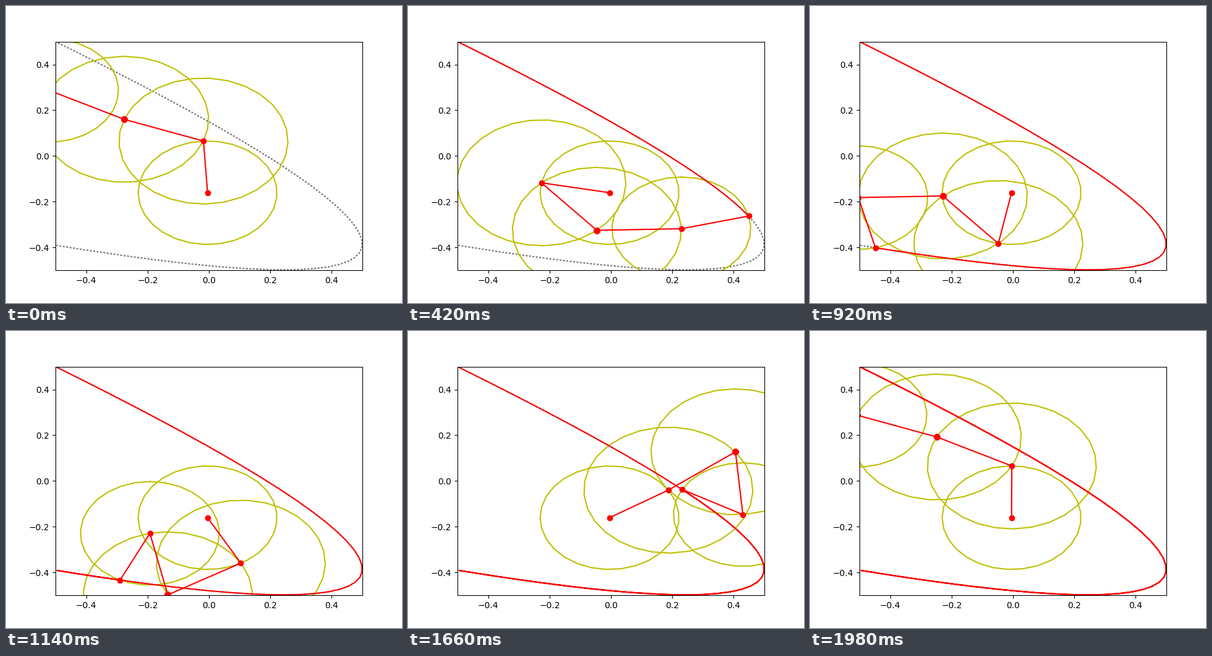
These frames come from a looping animation (640x480 px, 2 s). A matplotlib script:

```python
import numpy as np
import matplotlib.pyplot as plt
from matplotlib.animation import FuncAnimation

N = 100                        # samples and frames per loop
CENTER = -0.0045 - 0.1605j     # constant term
AXIS1 = -0.0126 + 0.4525j      # cos(u) term
AXIS2 = -0.504 + 0.222j        # cos(2u) term

# Each cosine splits into a pair of opposite rotations; the terms follow
# FFT order, so the vanishing ones all sit between +2 and -2.
freqs = np.array([1, 2] + [0] * (N - 5) + [-2, -1])
coefs = np.zeros(N - 1, dtype=complex)
half_step = np.pi / N
for k, axis in ((1, AXIS1), (2, AXIS2)):
    for f in (k, -k):
        coefs[freqs == f] = axis / 2 * np.exp(1j * f * half_step)


def joints(i):
    """Arm joints from the fixed centre to the pen at step i."""
    arms = coefs * np.exp(2j * np.pi * freqs * i / N)
    return np.cumsum(np.concatenate(([CENTER], arms)))


def show(line, z):
    line.set_data(z.real, z.imag)


poses = [joints(i) for i in range(N)]
curve = np.array([p[-1] for p in poses])
ring = np.exp(1j * np.linspace(0, 2 * np.pi, 30))
moving = np.flatnonzero(coefs)

fig, ax = plt.subplots(figsize=(6.4, 4.8), dpi=100)
ax.set_xlim(-0.5, 0.5)
ax.set_ylim(-0.5, 0.5)

ax.plot(curve.real, curve.imag, ":", color="gray")
circles = [ax.plot([], [], "y-")[0] for _ in moving]
chain, = ax.plot([], [], "ro-")
trail, = ax.plot([], [], "r-")


def update(i):
    pose = poses[i]
    for circle, k in zip(circles, moving):
        show(circle, pose[k] + coefs[k] * ring)
    show(chain, pose)
    show(trail, curve[:i + 1])
    return [*circles, chain, trail]


anim = FuncAnimation(fig, update, frames=N, interval=20, repeat=True,
                     repeat_delay=0, blit=False)
plt.show()
```
